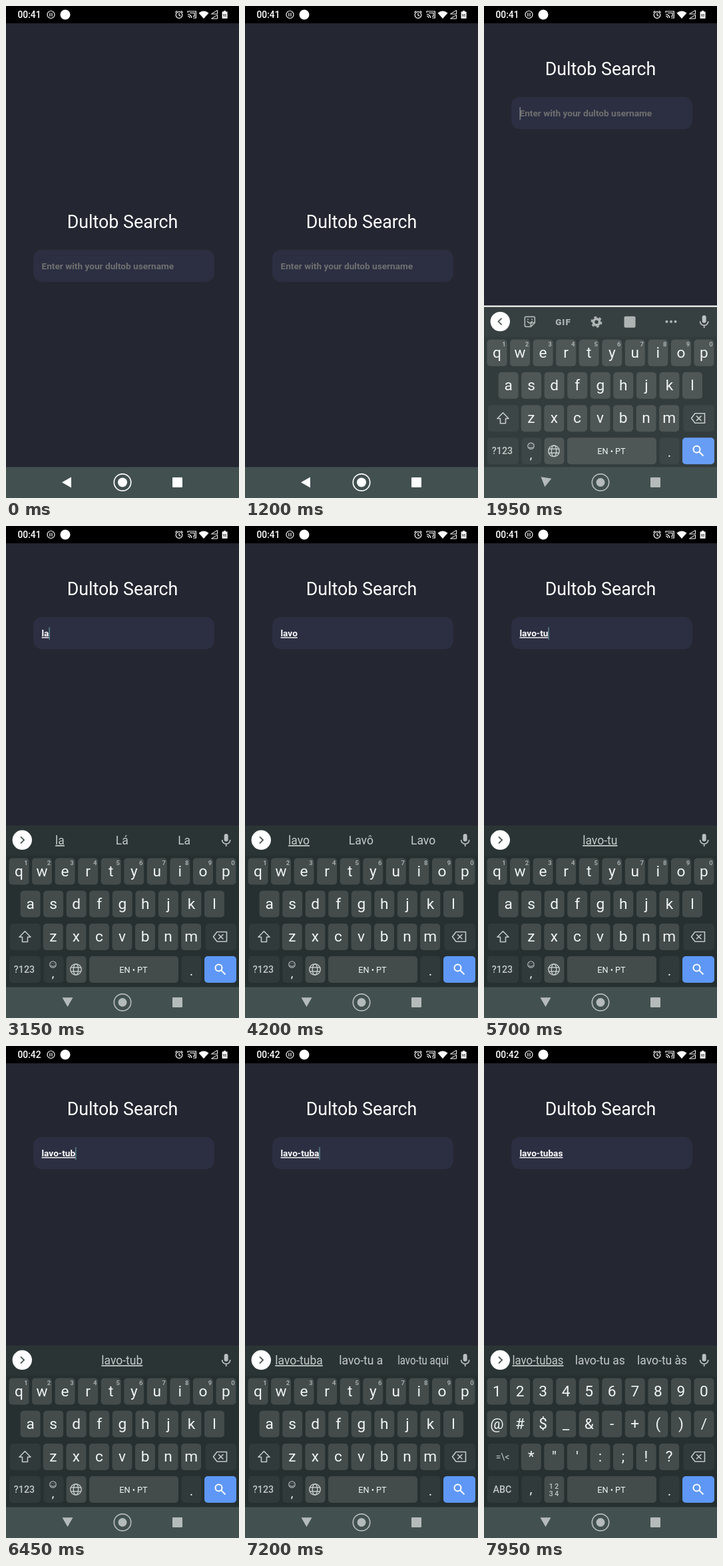
Recreate the animation shown at these times as an HTML page. Size 350 by 740 pixels, loop 8 s.

```html
<!DOCTYPE html>
<html lang="en">
<head>
<meta charset="utf-8">
<title>Search screen</title>
<style>
  html, body { margin: 0; width: 100%; height: 100%; overflow: hidden; background: #242631; }
  svg { display: block; width: 350px; height: 740px; font-family: Roboto, "Noto Sans", sans-serif; }
  .mid { text-anchor: middle; }
  .line { fill: none; stroke: #c3c8c8; stroke-width: 1.6; stroke-linejoin: round; stroke-linecap: round; }
  .status { fill: none; stroke: #fff; stroke-width: 1.2; }
</style>
</head>
<body>
<svg viewBox="0 0 350 740">
  <rect width="350" height="740" fill="#242631"/>

  <g id="app">
    <text class="mid" x="175" y="334" font-size="26.8" fill="#fff">Dultob Search</text>
    <rect x="41" y="366.5" width="272" height="48.5" rx="13" fill="#2c2f42"/>
    <text id="hint" x="53.5" y="396" font-size="13.65" font-weight="700" fill="#6e706f">Enter with your dultob username</text>
    <text id="typed" x="53.5" y="396" font-size="13.65" font-weight="700" fill="#fff" text-decoration="underline"></text>
    <rect id="caret" y="382" width="1.4" height="19" fill="#5c8d92"/>
  </g>

  <rect id="gap" y="450.5" width="350" height="243.5" fill="#fff"/>
  <g id="board">
    <rect y="450.5" width="350" height="290" fill="#263030"/>
    <rect y="450.5" width="350" height="45" fill="#2a3434"/>
    <circle cx="24.3" cy="472.3" r="14.7" fill="#fff"/>
    <path id="chevron" d="M22 467.3l5 5-5 5" fill="none" stroke="#4a5454" stroke-width="1.9"/>
    <g fill="#b9bfbf">
      <rect x="327.7" y="463" width="6" height="11.5" rx="3"/>
      <path d="M324.6 472a6.1 6.1 0 0 0 12.2 0M330.7 478v4" fill="none" stroke="#b9bfbf" stroke-width="1.7"/>
    </g>
    <g id="tools" fill="#a9b0b0">
      <path d="M63.3 465h11a2 2 0 0 1 2 2v7l-6 6h-7a2 2 0 0 1-2-2v-11a2 2 0 0 1 2-2zM76.3 474h-4a2 2 0 0 0-2 2v4M65.3 472q3 5 7 0M65.8 469h.5M71.800 469h.5"
        fill="none" stroke="#a9b0b0" stroke-width="1.7" stroke-linecap="round"/>
      <text class="mid" x="119" y="477.5" font-size="13.5" font-weight="900" letter-spacing="1">GIF</text>
      <circle cx="169" cy="473" r="4.6" fill="none" stroke="#a9b0b0" stroke-width="3.8"/>
      <circle cx="169" cy="473" r="7.3" fill="none" stroke="#a9b0b0" stroke-width="2.4" stroke-dasharray="3.8 3.844"/>
      <rect x="210.5" y="464.5" width="17" height="17" rx="2"/>
      <circle cx="274.5" cy="472.5" r="2"/><circle cx="281" cy="472.5" r="2"/><circle cx="287.5" cy="472.5" r="2"/>
    </g>
    <g id="words" class="mid" font-size="17.5" fill="#c5caca"></g>
    <g id="letters"></g>
    <g id="symbols"></g>
    <g id="shared"></g>
  </g>

  <rect y="693.5" width="350" height="46.5" fill="#425050"/>
  <g id="nav">
    <path id="back" d="M84 716.5l14-8v16z" stroke="none"/>
    <circle cx="175" cy="716.5" r="12.7" fill="none" stroke-width="1.7"/>
    <circle id="home" cx="175" cy="716.5" r="7" stroke="none"/>
    <rect x="250" y="709" width="15" height="15" rx="1" stroke="none"/>
  </g>

  <rect width="350" height="26" fill="#000"/>
  <text id="clock" x="17.5" y="18" font-size="13.8" font-weight="500" fill="#fff">00:41</text>
  <g class="status">
    <circle cx="67.5" cy="13" r="5.5"/>
    <path d="M66 10.3v5.4M69 10.3v5.4"/>
    <circle cx="260" cy="13.5" r="4.8"/>
    <path d="M260 10.5v3.3l2.3 1.4M254.3 9.8l2.9-2.4M265.7 9.8l-2.9-2.4"/>
    <path d="M273 10V8h12.3v10H281M273 12.3a5.7 5.7 0 0 1 5.7 5.7M273 15a3 3 0 0 1 3 3M276 10.5h7v5h-2"/>
    <path d="M308.500 12h9V6.500zM308.500 19h9v-5.500z" stroke-width="1"/>
  </g>
  <g fill="#fff">
    <circle cx="89" cy="13" r="7.5"/>
    <path d="M289.5 10.4q7.5-6 15 0L297 19z"/>
    <path d="M327 7h3v1.4h2.6v10.4h-8V8.4h2.4z"/>
  </g>
  <text class="mid" x="328.6" y="15.5" font-size="4.5" font-weight="700" fill="#222">93</text>
</svg>

<script>
const $ = id => document.getElementById(id);
const LOOP = 8000, STEP = 150, PITCH = 34.55;
const KEY = '#434b4b', DARK = '#303a3a';

const key = (x, y, w, fill = KEY) =>
  `<rect x="${x}" y="${y}" width="${w}" height="40" rx="5" fill="${fill}"/>`;
const label = (s, x, y, size, fill = '#f1f3f3', weight = 400) =>
  `<text class="mid" x="${x}" y="${y}" font-size="${size}" font-weight="${weight}" fill="${fill}">${s}</text>`;
const escapeText = c => c.replace('&', '&amp;').replace('<', '&lt;');

function row(chars, first, y, numbered) {
  return [...chars].map((c, i) => {
    const x = first + i * PITCH;
    return key(x - 15, y, 30) + label(escapeText(c), x, y + 27, 22.7) +
      (numbered ? label((i + 1) % 10, x + 10.5, y + 10.5, 9.5, '#a4abab', 700) : '');
  }).join('');
}

$('letters').innerHTML =
  row('qwertyuiop', 19.5, 499.5, true) + row('asdfghjkl', 36.6, 548.5) + row('zxcvbnm', 70.8, 598) +
  key(6, 598, 46, DARK) +
  '<path class="line" d="M28.5 609.5l-8.5 8.7h4.5v7.3h8v-7.3h4.5z"/>' +
  key(5, 647, 47, DARK) + label('?123', 27.5, 672, 14.3, '#c3c8c8', 500) +
  key(56.5, 647, 30, DARK) + label(',', 70.5, 679, 18) +
  '<circle class="line" cx="70.5" cy="659.5" r="4.7" style="stroke-width:1.1"/>' +
  '<path class="line" d="M68 661q2.5 3 5 0M69 658h.1M72 658h.1" style="stroke-width:1.1"/>' +
  key(90.5, 647, 30) +
  '<g class="line" style="stroke-width:1.4"><circle cx="105" cy="667" r="8.3"/><ellipse cx="105" cy="667" rx="3.7" ry="8.3"/>' +
  '<path d="M97.5 664h15M97.5 670h15"/></g>';

$('symbols').innerHTML =
  row('1234567890', 19.5, 499.5) + row('@#$_&-+()/', 19.5, 548.5) + row('*"\':;!?', 70.8, 598) +
  key(6, 598, 46, DARK) + label('=\\&lt;', 28, 622.5, 14, '#c3c8c8') +
  key(5, 647, 47, DARK) + label('ABC', 27.5, 672, 14.3, '#c3c8c8', 500) +
  key(56.5, 647, 30, DARK) + label(',', 70.5, 673, 20) +
  key(90.5, 647, 30) + label('1 2', 105, 666, 10.5, '#c3c8c8', 500) + label('3 4', 105, 677, 10.5, '#c3c8c8', 500);

$('shared').innerHTML =
  key(299.5, 598, 46.5, DARK) +
  '<path class="line" d="M317 610.5h14.5v14.5H317l-5.5-7.25zM319.5 614.5l6.5 6.5M326 614.5l-6.5 6.5"/>' +
  key(125, 647, 134) + label('EN • PT', 191.5, 671.5, 12.7) +
  key(263.5, 647, 30, DARK) + label('.', 278.5, 676, 21) +
  key(298, 647, 48, '#5e97f6') +
  '<g fill="none" stroke="#fff" stroke-width="2"><circle cx="319.5" cy="664.5" r="5"/><path d="M323 668l6.5 6.5"/></g>';

// [time, field text, suggestions]
const typing = [
  [0, '', []],
  [2700, 'l', ['l', 'Lá', 'L']],
  [3000, 'la', ['la', 'Lá', 'La']],
  [3300, 'lav', ['lav', 'Lavô', 'Lav']],
  [3600, 'lavo', ['lavo', 'Lavô', 'Lavo']],
  [4800, 'lavo-', ['', 'lavo-']],
  [5400, 'lavo-t', ['', 'lavo-t']],
  [5700, 'lavo-tu', ['', 'lavo-tu']],
  [6450, 'lavo-tub', ['', 'lavo-tub']],
  [6900, 'lavo-tuba', ['lavo-tuba', 'lavo-tu a', 'lavo-tu aqui']],
  [7500, 'lavo-tubas', ['lavo-tubas', 'lavo-tu as', 'lavo-tu às']]
];
const OPEN = 1800;
const caretOff = [[0, OPEN], [2400, 2700], [4200, 4800], [6150, 6450], [7950, LOOP]];
const symbolTimes = [[4500, 5100], [7800, LOOP]];

const within = (spans, t) => spans.some(([a, b]) => t >= a && t < b);
const show = (id, on) => $(id).setAttribute('display', on ? 'inline' : 'none');

// Long suggestions shrink sideways to stay in their column.
function setWords(words) {
  const shown = words.join('|');
  if ($('words').dataset.shown === shown) return;
  $('words').dataset.shown = shown;
  $('words').innerHTML = words.map((w, i) =>
    `<text y="479" ${w && (i === 0 || !words[0]) ? 'text-decoration="underline"' : ''}>${w}</text>`).join('');
  [...$('words').children].forEach((el, i) => {
    const scale = Math.min(1, 77 / (el.getComputedTextLength() || 1));
    el.setAttribute('transform', `translate(${81 + i * 93.3}) scale(${scale} 1)`);
  });
}

function draw(time) {
  const t = Math.floor(time / STEP) * STEP;
  const open = t >= OPEN;
  const rise = open ? Math.min(1, (t - OPEN + 75) / 300) : 0;
  const away = (1 - rise) ** 2;
  const [, text, words] = typing.filter(k => t >= k[0]).pop();
  const symbols = within(symbolTimes, t);

  $('app').setAttribute('transform', `translate(0 ${open ? -229.8 : 0})`);
  show('gap', rise > 0 && rise < 1);
  show('board', open);
  $('board').setAttribute('transform', `translate(0 ${37 * away})`);
  $('board').setAttribute('opacity', 1 - away);
  show('letters', !symbols);
  show('symbols', symbols);
  show('tools', !text);
  $('chevron').setAttribute('transform', text ? '' : 'rotate(180 24.3 472.3)');
  setWords(words);

  show('hint', !text);
  $('typed').textContent = text;
  show('caret', !within(caretOff, t));
  $('caret').setAttribute('x', 53.5 + (text ? $('typed').getComputedTextLength() : 0));
  $('caret').setAttribute('fill', text ? '#5c8d92' : '#84888c');

  const tone = open ? '#b4bbba' : '#fff';
  $('nav').setAttribute('fill', tone);
  $('nav').setAttribute('stroke', tone);
  $('back').setAttribute('transform', `rotate(${-90 * Math.min(1, rise * 1.2)} 91.65 715.65)`);
  $('home').setAttribute('r', open ? 6.5 : 7);
  $('clock').textContent = t >= 6450 ? '00:42' : '00:41';
}

const start = performance.now();
function tick() {
  draw((performance.now() - start) % LOOP);
  requestAnimationFrame(tick);
}
tick();
</script>
</body>
</html>
```
